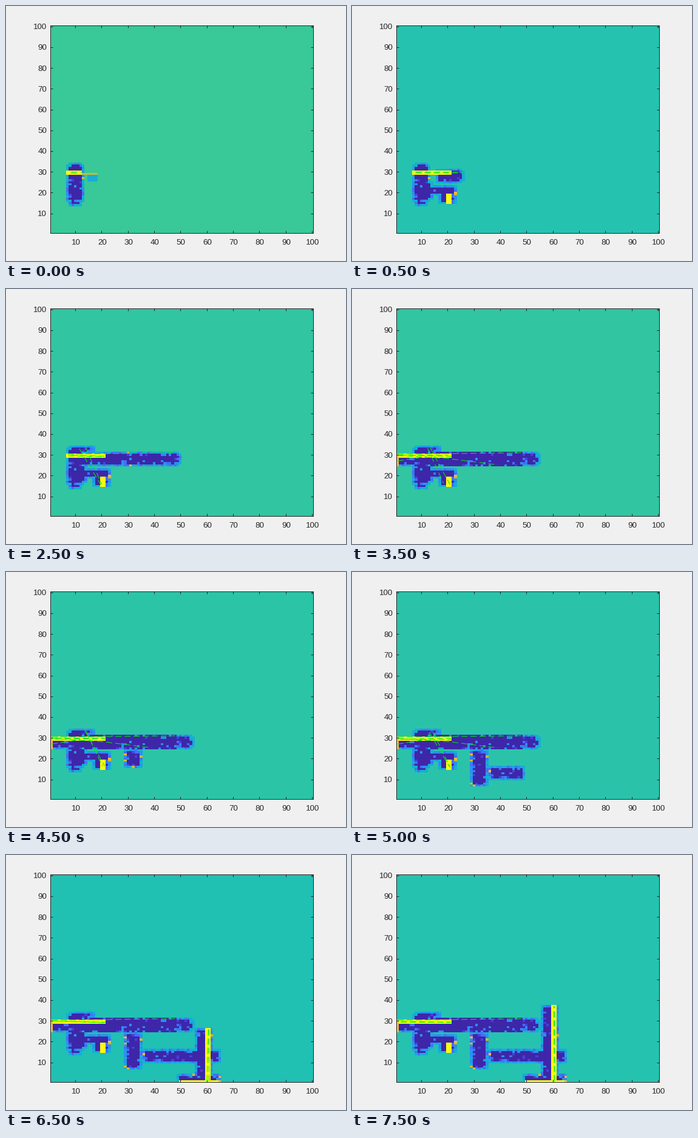
Write a matplotlib script that moves like this. It is 560x420 px and loops after 8 s.

```python
import numpy as np
import matplotlib.pyplot as plt
from matplotlib.animation import FuncAnimation
from matplotlib.transforms import Affine2D

W, H, DPI = 560, 420, 100
STEPS, INTERVAL = 16, 500
PX = 72 / DPI
INK = "#262626"

# Level 5 is the unexplored background, filled in per step.
LEVELS = np.array([
    (62, 38, 168), (70, 64, 222), (68, 110, 252), (40, 146, 238),
    (22, 174, 212), (0, 0, 0), (92, 204, 110), (200, 188, 44),
    (250, 188, 60), (250, 250, 18)]) / 255
BLUE, AZURE, CYAN, UNKNOWN, GREEN, MUSTARD, ORANGE, YELLOW = range(2, 10)
BG = np.array([(26, 191, 182), (38, 194, 176), (57, 200, 151)]) / 255

rng = np.random.default_rng(7)
NOISE, SHADE = rng.random((2, 100, 100))
YY, XX = np.mgrid[1:101, 1:101]


def ramp(n, n0, n1, a, b):
    """Whole number running from a to b between steps n0 and n1."""
    return round(float(np.interp(n, [n0, n1], [a, b])))


def box(x0, x1, y0, y1, rim=True):
    """Signed distance in cells to a rectangle, below 1 inside it."""
    dx = np.maximum(x0 - XX, XX - x1)
    dy = np.maximum(y0 - YY, YY - y1)
    outside = np.hypot(np.maximum(dx, 0), np.maximum(dy, 0))
    dist = outside + np.minimum(np.maximum(dx, dy), 0)
    return dist if rim else np.where(dist > 0, np.inf, dist)


def rooms(n):
    """Areas seen as free so far."""
    yield box(8, 12, 17, 32)
    yield box(9, 11, 15, 33)
    if n >= 1:
        yield box(8, 13, 18, 24)
        yield box(8, 21, 20, 22)
        yield box(18, 22, 16, 22)
        end = ramp(n, 3, 7, 44, 53) if n >= 3 else 24
        yield box(8 if n >= 3 else 17, end, 26, 30)
        yield box(end, end + 1, 27, 29)
    if n >= 2:
        yield box(9, 16, 32, 33)
    if n >= 6:
        yield box(14, 48, 25, 31, rim=False)
    if n >= 7:
        yield box(1, 8, 26, 28)
    if n >= 9:
        yield box(30, 34, 17 if n == 9 else 8, 23)
    if n >= 10:
        yield box(37, 48 if n == 10 else 64, 11, 15)
    if n >= 11:
        yield box(58, 61, 6, 17)
    if n >= 12:
        yield box(57, 61, 4 if n == 12 else 1, ramp(n, 12, 15, 20, 36))
    if n >= 13:
        yield box(50, 64, 1, 3)


def walls(n):
    """Solid cells as (x0, x1, y0, y1, level)."""
    if n == 0:
        yield 15, 18, 26, 28, CYAN
        yield 13, 18, 29, 29, MUSTARD
    else:
        yield 20, 21, 15, 19, YELLOW
    yield (2 if n >= 7 else 7), (21 if n else 12), 29, 30, YELLOW
    if n >= 7:
        yield 1, 1, 25, 30, ORANGE
    if n == 11:
        yield 60, 61, 11, 17, YELLOW
    if n >= 12:
        yield 60, 61, 4 if n == 12 else 1, ramp(n, 12, 15, 21, 37), YELLOW
    if n >= 13:
        yield 50, 64, 1, 1, YELLOW


def build(n):
    dist = np.minimum.reduce(list(rooms(n)))
    stray = NOISE < np.where(dist < 0, 0.06, 0.3)
    core = np.where(stray, 1 + (SHADE * 3).astype(int), 0)
    edge = np.select([SHADE < 0.2, SHADE < 0.55, SHADE < 0.94, SHADE < 0.97],
                     [BLUE, AZURE, CYAN, MUSTARD], ORANGE)
    grid = np.select([dist < 1, dist == 1, dist < 1.5],
                     [core, edge, CYAN], UNKNOWN)
    for x0, x1, y0, y1, level in walls(n):
        grid[y0 - 1:y1, x0 - 1:x1] = level

    mix = np.interp(n, [0, 1, 3, 7, 10, 11, 15], [1, .4, .75, .75, .53, 0, .4])
    colors = LEVELS.copy()
    colors[UNKNOWN] = [np.interp(mix, [0, 0.4, 1], c) for c in BG.T]
    return colors[grid]


def fan(n, start, end, count, spread):
    """Nearly parallel lines with slightly scattered ends."""
    jitter = np.random.default_rng(n).uniform(-1, 1, (count, 2, 2))
    return list(np.array([start, end]) + jitter * spread)


def rays(n):
    """Wall lines matched by the scan."""
    left = 1 if n >= 7 else 7
    right = (12.5, 21, 26)[0 if n == 0 else 2 if n < 3 else 1]
    lines = fan(n, (left + 1, 29.6), (right, 29.5), 2, (0.8, 0.4))
    if n >= 3:
        lines.append(np.array([(left, 30.3), (48, 31)]))
    if 3 <= n <= 10:
        lines += fan(n, (13, 33), (20, 16), 2, (1.6, 0.5))
    if 6 <= n <= 12:
        lines.append(np.array([(left, 29.7), (20, 28.2), (39, 25.2)]))
        lines.append(np.array([(left, 27), (12, 29.2)]))
    if n >= 11:
        low, top = (6, 18) if n == 11 else (1, ramp(n, 12, 15, 21, 37))
        lines += fan(n, (60.5, low), (60.5, top), 2, (0.5, 0))
    return lines


fig = plt.figure(figsize=(W / DPI, H / DPI), dpi=DPI, facecolor="#f0f0f0")
ax = fig.add_axes([73 / W, 46 / H, 433 / W, 342 / H])
img = ax.imshow(build(0), origin="lower", extent=(0.5, 100.5, 0.5, 100.5),
                interpolation="nearest", aspect="auto")
ax.set(xlim=(0.5, 100.5), ylim=(0.5, 100.5),
       xticks=range(10, 101, 10), yticks=range(10, 101, 10))
ax.tick_params(direction="in", top=True, right=True, length=4 * PX, width=PX,
               color=INK, labelcolor=INK, labelsize=13.33 * PX,
               labelfontfamily="Liberation Sans")
ax.tick_params(axis="x", pad=10.2 * PX)
ax.tick_params(axis="y", pad=6 * PX)
for label in ax.get_xticklabels():
    label.set_transform(label.get_transform() + Affine2D().translate(1, 0))
for spine in ax.spines.values():
    spine.set(linewidth=PX, color=INK)

pool = [ax.plot([], [], color="#00f000", lw=PX, dashes=(10, 5))[0]
        for _ in range(10)]


def update(n):
    img.set_data(build(n))
    for line in pool:
        line.set_data([], [])
    for line, path in zip(pool, rays(n)):
        line.set_data(*path.T)
    return [img, *pool]


anim = FuncAnimation(fig, update, frames=STEPS, interval=INTERVAL,
                     repeat=True, repeat_delay=0, blit=False)
plt.show()
```
